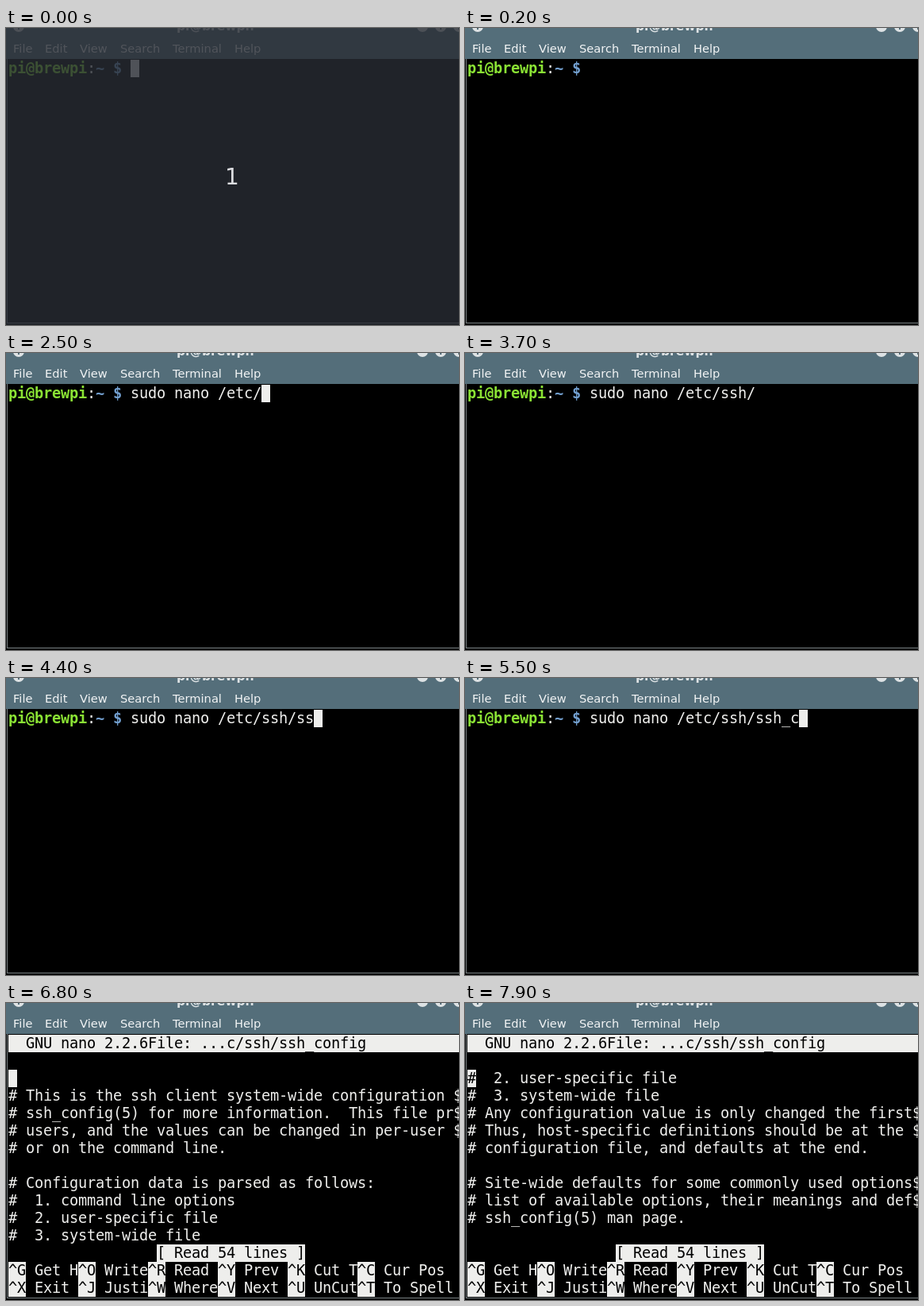
These frames come from a looping animation (571x374 px, 8000 ms). An HTML page with a canvas:

```html
<!DOCTYPE html>
<html lang="en">
<head>
<meta charset="utf-8">
<title>Editing a config file in a terminal</title>
<style>
  html, body { margin: 0; width: 100%; height: 100%; overflow: hidden; background: #000; }
  canvas { display: block; }
</style>
</head>
<body>
<canvas id="stage" width="571" height="374"></canvas>
<script>
const ctx = document.getElementById('stage').getContext('2d');
const LOOP = 8000;
const LEFT = 3, TOP = 40, CELL = 11, LINE = 22;
const WHITE = '#eeeeec', GREEN = '#8ae234', BLUE = '#729fcf', BAR = '#546e7a';
const MONO = '18.67px "DejaVu Sans Mono", monospace';
const SANS = '"DejaVu Sans", sans-serif';

const COMMAND = 'sudo nano /etc/ssh/ssh_config ';
// [time in ms, characters typed by then]
const TYPING = [
  [0, 0], [500, 1], [800, 3], [900, 4], [1300, 6], [1500, 8], [1700, 10],
  [1900, 11], [2300, 13], [2500, 15], [2800, 17], [2900, 18], [3700, 19],
  [4400, 21], [4800, 22], [5500, 24], [5800, 25], [6200, 30]
];
const CURSOR_OFF = [[200, 500], [3700, 4200]];
const CLEARED = 6500, EDITOR = 6800, CURSOR_DOWN = 7500, SCROLLED = 7900;

const FILE = [
  '',
  '# This is the ssh client system-wide configuration $',
  '# ssh_config(5) for more information.  This file pr$',
  '# users, and the values can be changed in per-user $',
  '# or on the command line.',
  '',
  '# Configuration data is parsed as follows:',
  '#  1. command line options',
  '#  2. user-specific file',
  '#  3. system-wide file',
  '# Any configuration value is only changed the first$',
  '# Thus, host-specific definitions should be at the $',
  '# configuration file, and defaults at the end.',
  '',
  '# Site-wide defaults for some commonly used options$',
  '# list of available options, their meanings and def$',
  '# ssh_config(5) man page.',
  ''
];
const VISIBLE_LINES = 10;
const HELP = [
  ['^G Get H', '^O Write', '^R Read', '^Y Prev', '^K Cut T', '^C Cur Pos'],
  ['^X Exit', '^J Justi', '^W Where', '^V Next', '^U UnCut', '^T To Spell']
];

function rect(x, y, w, h, color) {
  ctx.fillStyle = color;
  ctx.fillRect(x, y, w, h);
}

function label(text, x, y, font, color) {
  ctx.font = font;
  ctx.fillStyle = color;
  ctx.fillText(text, x, y);
}

function print(text, col, row, color = WHITE, bold = false) {
  const font = (bold ? 'bold ' : '') + MONO;
  [...text].forEach((char, i) =>
    label(char, LEFT + (col + i) * CELL, TOP + row * LINE + 17, font, color));
}

function printInverse(text, col, row) {
  rect(LEFT + col * CELL, TOP + row * LINE, text.length * CELL, LINE, WHITE);
  print(text, col, row, '#000');
}

function drawButton(x, mark) {
  ctx.fillStyle = '#dde2e4';
  ctx.beginPath();
  ctx.arc(x, -2, 7, 0, 2 * Math.PI);
  ctx.fill();
  if (mark) rect(x - 1, 0, 2, 2, BAR);
}

function drawWindow() {
  rect(0, 0, 571, 374, '#000');
  rect(0, 0, 571, 39, BAR);
  rect(1, 39, 1, 333, '#7c8386');
  rect(1, 371, 570, 1, '#7c8386');
  label('pi@brewpi: ~', 215, 3, 'bold 15.5px ' + SANS, '#dde2e4');
  drawButton(16, true);
  drawButton(525, false);
  drawButton(548, true);
  drawButton(571, true);
  const menu = { File: 10, Edit: 50, View: 94, Search: 145, Terminal: 211, Help: 289 };
  for (const [name, x] of Object.entries(menu)) {
    label(name, x - 1, 31, '14.67px ' + SANS, '#f2f4f5');
  }
}

function drawShell(t) {
  print('pi@brewpi', 0, 0, GREEN, true);
  print(':', 9, 0);
  print('~ $', 10, 0, BLUE, true);
  const typed = TYPING.filter(([time]) => time <= t).pop()[1];
  print(COMMAND.slice(0, typed), 14, 0);
  if (!CURSOR_OFF.some(([from, to]) => t >= from && t < to)) {
    printInverse(' ', 14 + typed, 0);
  }
}

function drawEditor(t) {
  const first = t < SCROLLED ? 0 : 8;
  const cursor = t >= CURSOR_DOWN && t < SCROLLED ? 2 : 0;
  printInverse('  GNU nano 2.2.6File: ...c/ssh/ssh_config'.padEnd(52), 0, 0);
  const lines = FILE.slice(first, first + VISIBLE_LINES);
  lines.forEach((line, i) => print(line, 0, i + 2));
  printInverse(lines[cursor][0] || ' ', 0, cursor + 2);
  printInverse('[ Read 54 lines ]', 17, 12);
  HELP.forEach((entries, row) => entries.forEach((entry, i) => {
    printInverse(entry.slice(0, 2), i * 8, 13 + row);
    print(entry.slice(2), i * 8 + 2, 13 + row);
  }));
}

function drawCountdown() {
  rect(0, 0, 571, 374, 'rgba(40, 44, 52, 0.8)');
  label('1', 276, 197, '28px ' + SANS, '#dcdde0');
}

function draw() {
  const t = performance.now() % LOOP;
  drawWindow();
  if (t < CLEARED) drawShell(t);
  else if (t >= EDITOR) drawEditor(t);
  if (t < 200) drawCountdown();
  requestAnimationFrame(draw);
}
draw();
</script>
</body>
</html>
```
